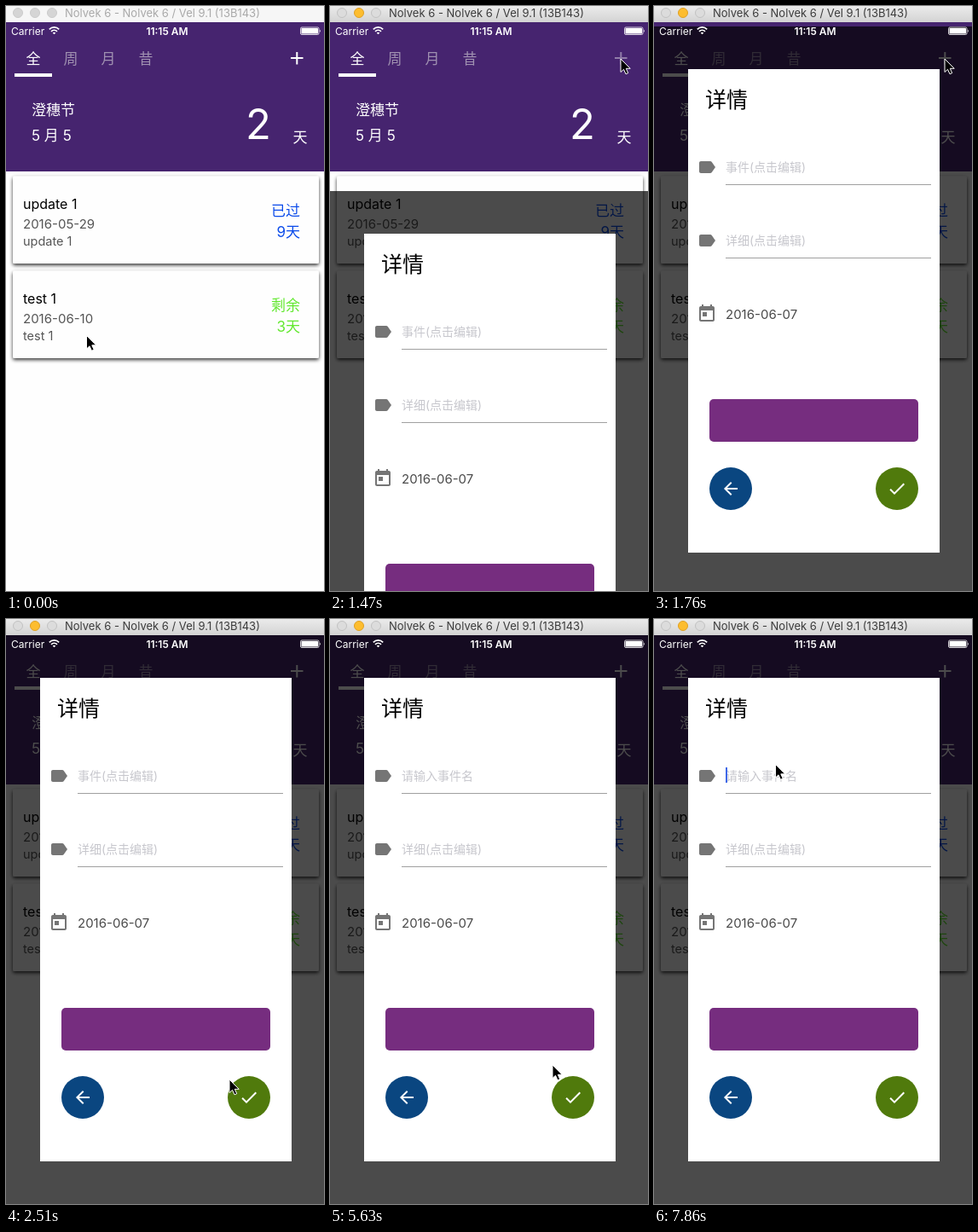
These frames come from a looping animation (373x686 px, 8000 ms). An HTML page:

```html
<!DOCTYPE html>
<html lang="zh-CN">
<head>
<meta charset="utf-8">
<title>Day counter</title>
<style>
  html, body { margin: 0; width: 100%; height: 100%; overflow: hidden; background: #fff; }
  svg { display: block; width: 100%; height: 100%; }
  text { font-family: Inter, "Noto Sans CJK SC", "Noto Sans CJK", sans-serif; white-space: pre; }
  .mid { text-anchor: middle; }
  .end { text-anchor: end; }
  .hint { font-size: 14px; fill: #c7c7cd; }
  .grey { fill: #757575; }
</style>
</head>
<body>
<svg viewBox="0 0 373 686">
  <defs>
    <linearGradient id="chrome" x1="0" y1="0" x2="0" y2="1">
      <stop offset="0" stop-color="#ebebeb"/><stop offset="1" stop-color="#d3d3d3"/>
    </linearGradient>
    <filter id="shade" x="-5%" y="-10%" width="110%" height="125%">
      <feDropShadow dx="0" dy="2" stdDeviation="2" flood-color="#000" flood-opacity=".8"/>
    </filter>
    <path id="label" d="M17.63 5.84C17.27 5.33 16.67 5 16 5H5C3.9 5 3 5.9 3 7v10c0 1.1.9 2 2 2h11c.67 0 1.27-.33 1.63-.84L22 12z"/>
  </defs>

  <rect width="373" height="686" fill="#fefefe"/>

  <!-- header -->
  <rect y="19" width="373" height="175" fill="#46246f"/>
  <g font-size="17" fill="#fff">
    <g id="tabs" class="mid"></g>
    <rect x="10" y="79" width="44" height="4"/>
    <path id="plus" d="M334 61H348.5M341.3 54V68.5" stroke="#fff" stroke-width="2"/>
    <text x="30" y="128">澄穗节</text>
    <text x="30" y="158">5 月 5</text>
    <text x="281" y="156" font-size="49">2</text>
    <text x="336.5" y="159.5">天</text>
  </g>

  <g id="cards"></g>

  <!-- sheet -->
  <g id="sheet">
    <rect y="19" width="373" height="667" fill="#000" opacity=".7"/>
    <rect x="40" y="69" width="295" height="567" fill="#fff"/>
    <text x="60" y="113.5" font-size="25">详情</text>
    <g id="tag"><use href="#label" x="50" y="172" class="grey"/></g>
    <use href="#label" x="50" y="258" class="grey"/>
    <text id="hint" class="hint" x="84" y="189"></text>
    <text class="hint" x="84" y="275">详细(点击编辑)</text>
    <path d="M84 204.5H325M84 290.5H325" stroke="#a0a0a0"/>
    <rect id="caret" x="84" y="174" width="2" height="18" fill="#3f68e8"/>
    <path class="grey" transform="translate(50 344)" fill-rule="evenodd" d="M19 3h-1V1h-2v2H8V1H6v2H5c-1.1 0-2 .9-2 2v14c0 1.1.9 2 2 2h14c1.1 0 2-.9 2-2V5c0-1.1-.9-2-2-2zm0 16H5V8h14zM7 10h5v5H7z"/>
    <text x="84" y="361.5" font-size="15" fill="#4a4a4a">2016-06-07</text>
    <rect x="65" y="456" width="245" height="50" rx="5" fill="#762d7f"/>
    <circle cx="90" cy="561" r="25" fill="#0a4680"/>
    <circle cx="285" cy="561" r="25" fill="#507a0c"/>
    <path transform="translate(78 549)" fill="#fff" d="M20 11H7.8l5.6-5.6L12 4l-8 8 8 8 1.4-1.4L7.8 13H20z"/>
    <path id="check" transform="translate(273 549)" fill="#fff" d="M9 16.2L4.8 12l-1.4 1.4L9 19 21 7l-1.4-1.4z"/>
  </g>

  <!-- status bar -->
  <g fill="#fff" font-size="12">
    <text x="6" y="33.5">Carrier</text>
    <path d="M50.8 27.3a8 8 0 0 1 11.4 0M53 29.8a5 5 0 0 1 7 0" fill="none" stroke="#fff" stroke-width="1.7"/>
    <path d="M54.7 31.5a2.6 2.6 0 0 1 3.6 0L56.5 33.3z"/>
    <text class="mid" x="189" y="33.5" font-weight="600">11:15 AM</text>
    <rect x="345.5" y="25" width="21.5" height="8.5" rx="1.5" fill="none" stroke="#fff" stroke-width=".8"/>
    <rect x="346.5" y="26" width="19.5" height="6.5" rx=".6"/>
    <path d="M368 27.5q1.8 1.7 0 3.5z"/>
  </g>

  <!-- window title -->
  <rect id="bar" width="373" height="19"/>
  <g id="dots"></g>
  <text id="name" x="69" y="12.7" font-size="13">Nolvek 6 - Nolvek 6 / Vel 9.1 (13B143)</text>

  <path id="mouse" d="M0 0V15.5L3.5 12.3 6 17.8 8.7 16.6 6.3 11.3H11.2Z" stroke="#fff"/>
</svg>

<script>
const $ = id => document.getElementById(id);
const set = (id, name, value) => $(id).setAttribute(name, value);
const LOOP = 8000, STEP = 148.3, LAG = 20;

$('tabs').innerHTML = [...'全周月昔'].map((name, i) =>
  `<text x="${32 + 44 * i}" y="67.5" fill="${i ? '#a091b1' : '#fff'}">${name}</text>`).join('');

const cards = [
  { title: 'update 1', date: '2016-05-29', state: '已过', days: '9天', color: '#0b4bea' },
  { title: 'test 1', date: '2016-06-10', state: '剩余', days: '3天', color: '#62e82f' }
];
$('cards').innerHTML = cards.map((c, i) => `
  <g transform="translate(0 ${199 + 111 * i})">
    <rect x="8" y="0.5" width="359" height="102.5" rx="2" fill="#fefefe" filter="url(#shade)"/>
    <text x="20" y="39" font-size="16">${c.title}</text>
    <g fill="#555">
      <text x="20" y="61.5" font-size="15">${c.date}</text>
      <text x="20" y="82" font-size="14.5">${c.title}</text>
    </g>
    <g class="end" font-size="17" fill="${c.color}">
      <text x="345" y="46.5">${c.state}</text>
      <text x="345" y="72">${c.days}</text>
    </g>
  </g>`).join('');

$('dots').innerHTML = [0, 1, 2].map(i => `<circle cx="${14 + 20 * i}" cy="8" r="5.5"/>`).join('');
const dots = [...$('dots').children];

// pointer: rest, then eased moves to each stop
const home = { x: 94.5, y: 386.5 };
const moves = [
  { from: 130, to: 140, x: 88, y: 302 },     // list
  { from: 440, to: 1030, x: 341, y: 62 },    // plus
  { from: 1920, to: 2510, x: 262, y: 540 },
  { from: 2510, to: 2810, x: 283, y: 560 },  // check
  { from: 3700, to: 4290, x: 149, y: 255 },
  { from: 4290, to: 4890, x: 138, y: 188 },  // field
  { from: 5200, to: 5630, x: 261, y: 523 },
  { from: 5630, to: 5930, x: 285, y: 562 },  // check
  { from: 6780, to: 7410, x: 142.5, y: 170.5 }
];
const presses = [3100, 6360], POP = 1350;

const ease = p => p * p * (3 - 2 * p);
const clamp = p => Math.min(1, Math.max(0, p));

function pointer(t) {
  return moves.reduce((at, m) => {
    const p = ease(clamp((t - m.from) / (m.to - m.from)));
    return { x: at.x + (m.x - at.x) * p, y: at.y + (m.y - at.y) * p };
  }, home);
}

// critically damped slide from the bottom edge
function rise(t) {
  const w = Math.max(0, t - 1316) * 0.01526;
  return Math.round(667 * (1 + w) * Math.exp(-w));
}

function draw(now) {
  // the picture advances in even steps
  const k = Math.floor((now % LOOP + LAG) / STEP);
  const t = Math.max(0, k * STEP - LAG + 14);

  const active = t >= 880;
  set('bar', 'fill', active ? 'url(#chrome)' : '#f6f6f6');
  set('name', 'fill', active ? '#3c3c3c' : '#a9a9a9');
  dots.forEach((dot, i) => {
    const lit = active && i === 1;
    dot.setAttribute('fill', lit ? '#fdbd2f' : active ? '#dcdcdc' : '#d5d5d5');
    dot.setAttribute('stroke', lit ? '#dfa023' : active ? '#c2c2c2' : '#cbcbcb');
  });

  set('plus', 'opacity', t >= 1180 && t < 1600 ? 0.4 : 1);
  set('sheet', 'transform', `translate(0 ${rise(t)})`);

  const press = presses.filter(p => t >= p).pop();
  const since = press ? t - press : Infinity;
  const size = since < POP ? 1 + 0.1 * Math.sin(3 * Math.PI * since / POP) : 1;
  set('tag', 'transform', `translate(62.5 184) scale(${size}) translate(-62.5 -184)`);
  set('check', 'opacity', since < 400 ? 0.4 : 1);
  $('hint').textContent = press ? '请输入事件名' : '事件(点击编辑)';
  set('caret', 'opacity', t >= 7850 ? 1 : 0);

  const { x, y } = pointer(t);
  set('mouse', 'transform', `translate(${x} ${y})`);
}

let start;
function tick(now) {
  start ??= now;
  draw(now - start);
  requestAnimationFrame(tick);
}
draw(0);
requestAnimationFrame(tick);
</script>
</body>
</html>
```
